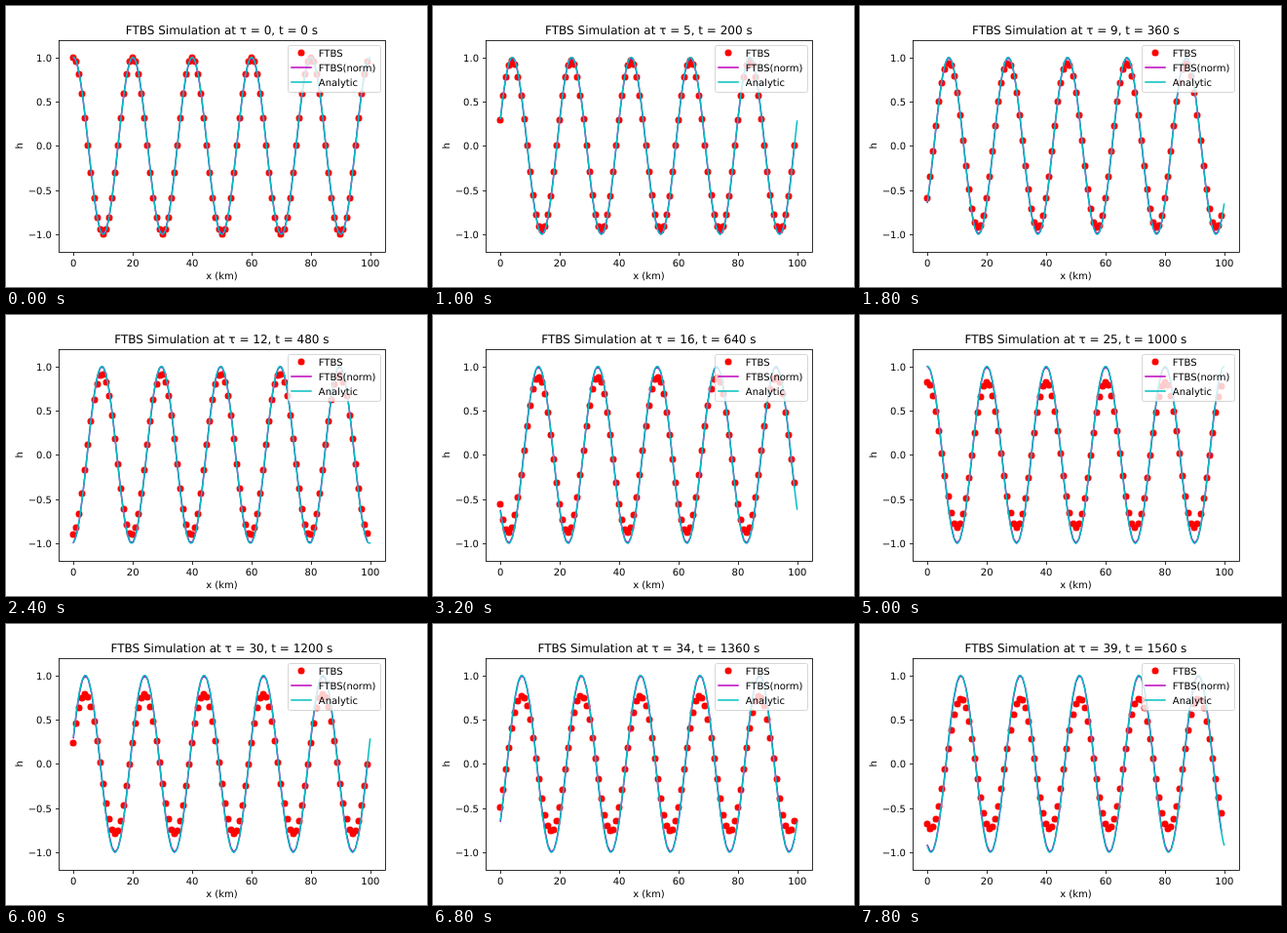
Animation of 432 by 288 pixels, one loop 8 s. Source, as an HTML page:

```html
<!DOCTYPE html>
<html lang="en">
<head>
<meta charset="utf-8">
<title>FTBS Simulation</title>
<style>
  html, body { margin: 0; width: 100%; height: 100%; overflow: hidden; background: #fff; }
  svg { display: block; }
  text { font: 10px "DejaVu Sans", sans-serif; text-rendering: geometricPrecision; }
  #title { font-size: 12px; }
  .mid { text-anchor: middle; }
  .end { text-anchor: end; }
  .axis { fill: none; stroke: #000; stroke-width: .8; }
  .line { fill: none; stroke-width: 1.5; stroke-linejoin: round; stroke-linecap: square; }
  .norm { stroke: #bf00bf; }
  .analytic { stroke: #00bfbf; }
  .dot { fill: #f00; }
</style>
</head>
<body>
<svg width="432" height="288" viewBox="0 0 432 288">
  <g id="dots"></g>
  <path id="norm" class="line norm"/>
  <path id="analytic" class="line analytic"/>
  <g id="ticks"></g>
  <rect class="axis" x="54.5" y="35.5" width="335" height="217"/>
  <text id="title" class="mid" x="221.4" y="29"></text>
  <text class="mid" x="221.4" y="280">x (km)</text>
  <text class="mid" transform="translate(17 143.3) rotate(-90)">h</text>
  <rect x="289.5" y="40.5" width="95" height="48" rx="2" fill="#fff" stroke="#ccc" opacity=".8"/>
  <circle class="dot" cx="303" cy="48" r="3.5"/>
  <path class="line norm" d="M293 63h20"/>
  <path class="line analytic" d="M293 78h20"/>
  <text x="320.8" y="52">FTBS</text>
  <text x="320.8" y="67">FTBS(norm)</text>
  <text x="320.8" y="82">Analytic</text>
</svg>
<script>
const STEP_MS = 200, STEPS = 40, DT = 40;      // DT in simulated seconds
const WAVE = 2 * Math.PI / 20;                 // wavelength 20 km
const COURANT = 0.8, POINTS = 100;

// Complex growth factor per step of the upwind scheme on a 1 km grid
const re = 1 - COURANT * (1 - Math.cos(WAVE));
const im = COURANT * Math.sin(WAVE);
const damping = Math.hypot(re, im);
const lag = Math.atan2(im, re);

const $ = id => document.getElementById(id);
const px = x => 69.218 + x * 3.04668;
const py = h => 143.28 - h * 90.6;

function add(parent, tag, attrs, text = "") {
  const node = document.createElementNS(parent.namespaceURI, tag);
  for (const key in attrs) node.setAttribute(key, attrs[key]);
  node.textContent = text;
  return parent.appendChild(node);
}

function curve(count, dx, height) {
  let d = "";
  for (let i = 0; i < count; i++) {
    d += (i ? "L" : "M") + px(i * dx).toFixed(2) + " " + py(height(i * dx)).toFixed(2);
  }
  return d;
}

for (let x = 0; x <= 100; x += 20) {
  add($("ticks"), "path", { class: "axis", d: `M${Math.round(px(x)) + .5} 252.5v3.5` });
  add($("ticks"), "text", { class: "mid", x: px(x), y: 267 }, x);
}
for (let h = -1; h <= 1; h += .5) {
  const y = Math.round(py(h));
  add($("ticks"), "path", { class: "axis", d: `M54.5 ${y + .5}h-3.5` });
  add($("ticks"), "text", { class: "end", x: 47, y: y + 4 }, h.toFixed(1).replace("-", "\u2212"));
}

const dots = Array.from({ length: POINTS }, (_, x) =>
  add($("dots"), "circle", { class: "dot", cx: Math.round(px(x)), r: 3.5 }));

function draw(n) {
  const norm = x => Math.cos(WAVE * x - lag * n);
  const analytic = x => Math.cos(WAVE * (x - COURANT * n));
  dots.forEach((dot, x) => dot.setAttribute("cy", Math.round(py(damping ** n * norm(x)))));
  $("norm").setAttribute("d", curve(POINTS, 1, norm));
  $("analytic").setAttribute("d", curve(1000, .1, analytic));
  $("title").textContent = `FTBS Simulation at τ = ${n}, t = ${n * DT} s`;
}

let shown = -1;
function tick() {
  const n = Math.floor(performance.now() / STEP_MS) % STEPS;
  if (n !== shown) draw(shown = n);
  requestAnimationFrame(tick);
}
tick();
</script>
</body>
</html>
```
